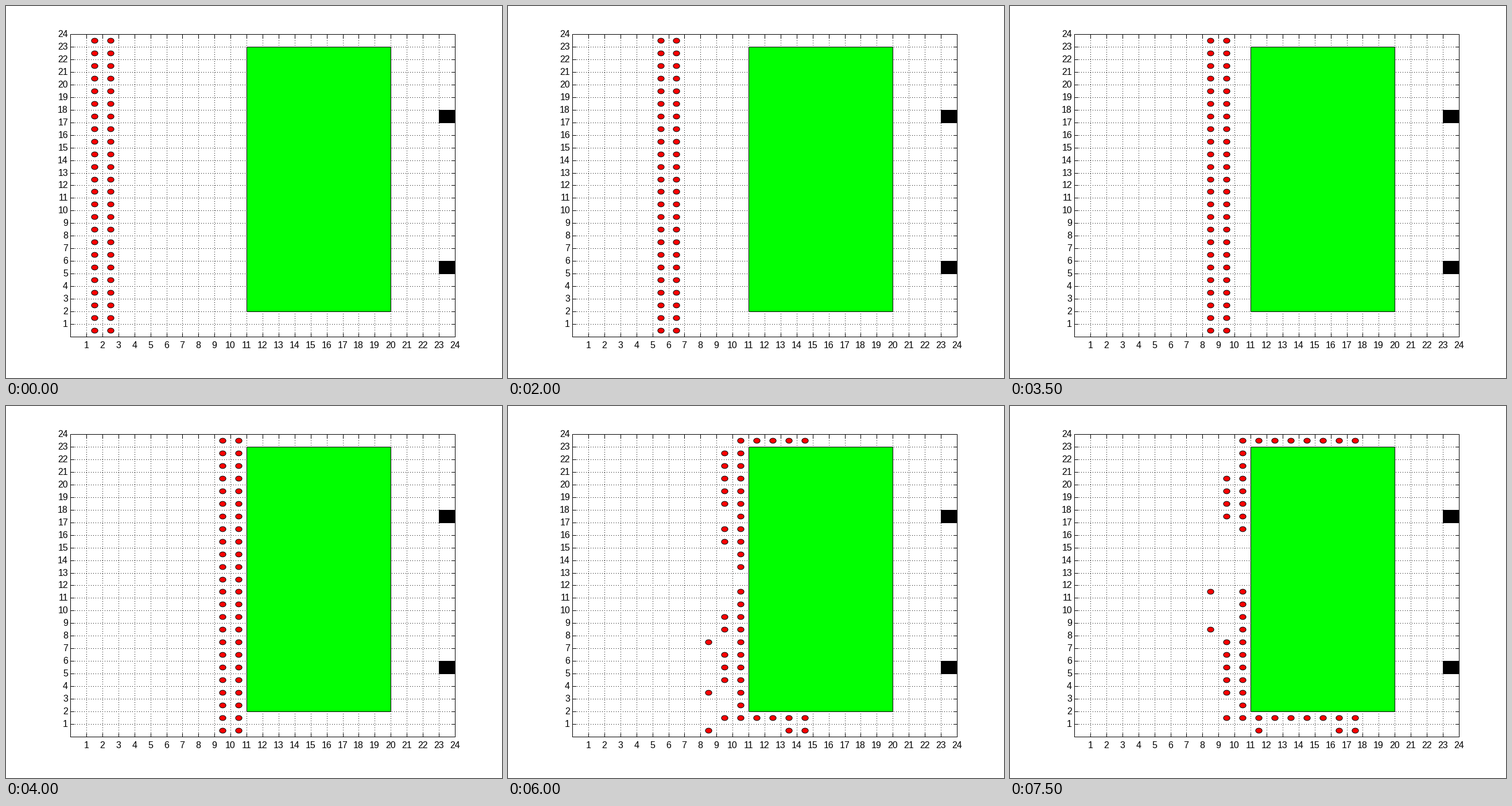
These frames come from a looping animation (864 px wide and 648 px high, 8000 ms). A matplotlib script:

```python
import random

import matplotlib.pyplot as plt
from matplotlib.animation import FuncAnimation
from matplotlib.collections import EllipseCollection
from matplotlib.patches import Rectangle

W, H = 864, 648
LEFT, RIGHT, TOP, BOTTOM = 112, 782, 49, 576
N = 24
TICK = 6
MARCH = 8               # steps until the front reaches the obstacle
STEPS = 16
CROWD = 2 * N
COLUMN = range(2, 23)   # rows beside the obstacle
SEED = 7


def px(u):
    return round(LEFT + (RIGHT - LEFT) * u / N)


def py(v):
    return round(BOTTOM - (BOTTOM - TOP) * v / N)


def cells(step):
    """Occupied (column, row) cells at a step."""
    if step <= MARCH:
        return [(c + step, r) for c in (1, 2) for r in range(N)]
    k = step - MARCH
    front = 10 + k
    # streams passing above and below the obstacle
    out = [(c, 23) for c in range(10, front + 1)]
    out += [(c, 1) for c in range(max(9, 11 - k), front + 1)]
    out += [(front - 1, 0), (front, 0)]
    if k >= 4:
        out.append((k + 4, 0))
    # the queue empties from the middle; two walkers are pushed back
    out += [(10, r) for r in COLUMN if r not in range(12, 9 + k)]
    rng = random.Random(SEED + k)
    second = [r for r in COLUMN if abs(r - 12) > k // 2]
    waiting = rng.sample(second, CROWD - len(out) - 2)
    pushed = rng.sample([r for r in COLUMN if r not in waiting], 2)
    return out + [(9, r) for r in waiting] + [(8, r) for r in pushed]


def centres(step):
    return [(px(c + 0.5) + 0.5, py(r + 0.5) + 0.5) for c, r in cells(step)]


fig = plt.figure(figsize=(W / 72, H / 72), dpi=72, facecolor="white")
ax = fig.add_axes([0, 0, 1, 1])
ax.set_xlim(0, W)
ax.set_ylim(H, 0)
ax.axis("off")


def line(xs, ys, style="-", z=3):
    ax.plot(xs, ys, color="black", lw=1, ls=style, zorder=z, snap=True,
            dash_capstyle="butt", solid_capstyle="projecting",
            solid_joinstyle="miter")


def block(c0, r0, c1, r1, color):
    ax.add_patch(Rectangle((px(c0), py(r0)), px(c1) - px(c0), py(r1) - py(r0),
                           facecolor=color, edgecolor="black", lw=1,
                           snap=True, zorder=1))


def label(x, y, text, align):
    ax.text(x, y, text, ha=align, va="baseline", fontsize=16,
            family="Liberation Sans", color="black", zorder=4)


x0, x1, y0, y1 = px(0), px(N), py(0), py(N)
DOTS = (0.5, (1, 3))
for i in range(1, N + 1):
    x, y = px(i), py(i)
    if i < N:
        line([x, x], [y0, y1], DOTS, 0)
        line([x0, x1], [y, y], DOTS, 0)
    line([x, x], [y0, y0 - TICK])
    line([x, x], [y1, y1 + TICK])
    line([x0, x0 + TICK], [y, y])
    line([x1, x1 - TICK], [y, y])
    label(x, 596, str(i), "center")
    label(108, y + 5, str(i), "right")
line([x0, x1, x1, x0, x0], [y0, y0, y1, y1, y0])

block(11, 2, 20, 23, "#00ff00")
block(23, 17, 24, 18, "black")
block(23, 5, 24, 6, "black")

crowd = EllipseCollection([11.2] * CROWD, [8.8] * CROWD, [0] * CROWD,
                          units="x", offsets=centres(0),
                          offset_transform=ax.transData, facecolor="red",
                          edgecolor="black", linewidth=1, zorder=2)
ax.add_collection(crowd)


def update(step):
    crowd.set_offsets(centres(step))
    return [crowd]


anim = FuncAnimation(fig, update, frames=STEPS, interval=500,
                     repeat=True, repeat_delay=0, blit=False)
plt.show()
```
